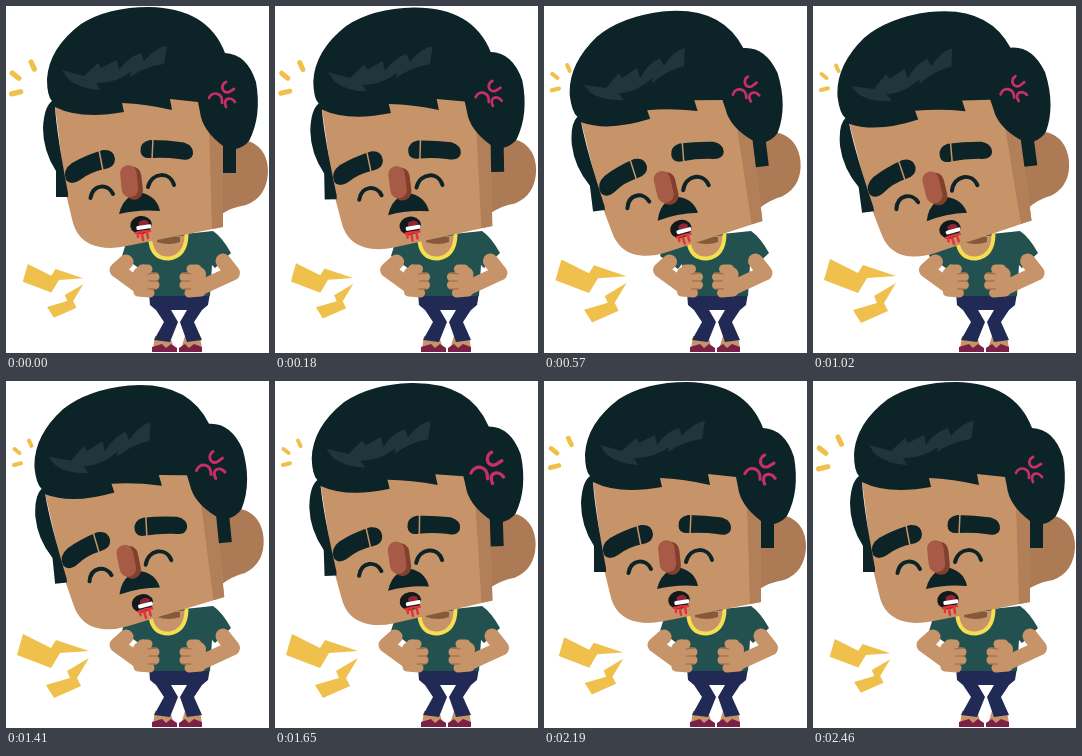
These frames come from a looping animation (263 by 347 pixels, 2.49 s). An HTML page:

```html
<!DOCTYPE html>
<html lang="en">
<head>
<meta charset="utf-8">
<title>Stomach ache</title>
<style>
  html, body { margin: 0; width: 100%; height: 100%; overflow: hidden; background: #fff; }
  svg { display: block; width: 100%; height: 100%; }
  .line { fill: none; stroke-linecap: round; stroke-linejoin: round; }
  .hair { fill: #0c2327; }
  .skin { fill: #c79369; }
  .limb { stroke: #c79369; }
  .crease { stroke: #9a693f; stroke-width: 1; }
</style>
</head>
<body>
<svg viewBox="0 0 263 347">
  <defs>
    <g id="hand" class="line">
      <path class="limb" stroke-width="9" d="M136 263 L142 263 M135 271 H149 M134 279 H149 M132 286 L144 287"/>
      <path class="limb" stroke-width="14" d="M134 268 L135 282"/>
      <path class="crease" d="M142 268 L151 267 M143 275 H152 M142 283 H150"/>
    </g>
  </defs>

  <g id="sparks" class="line" stroke="#f0c04a" stroke-width="4">
    <path d="M23 59.500 L25.500 65 M8.500 68 L13.500 72 M8 84 L15 82.300"/>
  </g>
  <g id="bolts" fill="#efc04b">
    <path d="M11 274 L17 253 L45 267 L50 259 L83 270 L54 272 L45 287Z"/>
    <path d="M83 277 L61 290 L64 297 L40 304 L48 317 L75 305 L71 297Z"/>
  </g>

  <g id="legs">
    <path class="skin" d="M149 330 H164 L168 343 H147Z M179 330 H194 L196 343 H175Z"/>
    <path fill="#7b2046" d="M146 346 V341 L156 338 L160 342 L165 338 L171 342 V346Z M173 346 V342 L179 338 L183 342 L188 338 L196 341 V346Z"/>
    <path fill="#202a55" d="M143 287 H204 L202 299 L196 304 L188 316 L196 334 L181 336 L174 316 L181 304 H165 L172 316 L164 336 L148 334 L158 316 L150 304 L144 299Z"/>
  </g>

  <path fill="#225150" d="M121 234 L207 225 Q216 231 225 247 L209 262 L206 259 L204 290 H142 L138 258 L134 263 L116 250Z"/>
  <path class="skin" d="M144 234 Q145 251 162 251 Q180 250 181 229Z"/>
  <path fill="#85593a" d="M151 231 H174 V236 Q163 240 151 236Z"/>
  <path class="line" stroke="#f5de50" stroke-width="4" d="M144.500 236 Q147 253 163 252.500 Q180 250 180.500 229"/>

  <g id="leftArm">
    <path class="line limb" stroke-width="15" d="M120 256 L111 264 L133 280"/>
    <use href="#hand"/>
  </g>
  <g id="rightArm">
    <path class="line limb" stroke-width="15" d="M217 255 L226.500 267 L194 282"/>
    <use href="#hand" transform="matrix(-1 0 0 1 327 0)"/>
  </g>

  <g id="head">
    <path fill="#ac7a55" d="M214 142 Q230 132 245 136 Q262 144 262 166 Q261 191 240 199 Q226 201 214 209Z"/>
    <path class="skin" d="M48 92 L200 88 L217 135 V221 L118 240.500 Q105 243 94 241 Q71 237 66 213 L60 188Z"/>
    <path fill="#b17f58" d="M203 122 L217 138 V221 L206 223Z"/>
    <path class="hair" d="M50 191 V165 Q37 145 37 122 Q38 101 46 95 Q41 90 41 73 Q43 42 75 18 Q102 1 143 1 Q202 2 219 47 Q241 48 250 76 Q256 110 243 135 Q238 141 230 143 V167 H217 V140 Q196 124 194 106 L192 96 L164 93 L166 104 Q140 98 116 97 L118 106 Q75 114 49 101 Q51 130 62 187 V191Z"/>
    <path fill="#1f363a" d="M56 64 L62 73 Q74 83 94 84 L90 77 Q108 78 125 66 L124 71 Q140 60 158 58 L161 40 Q150 41 138 55 L135 47 Q122 51 113 64 L111 54 L95 62 L92 57 L78 70Z"/>
    <g id="anger" class="line" stroke="#c82f66" stroke-width="2.700">
      <path d="M220 76 C214 79 216 88 223 86 L228 83 M203 92 C206 85 217 86 216 97 M220 101 C216 92 225 90 229 96"/>
    </g>

    <g id="features" transform="translate(-1 1)">
      <path class="hair" d="M61 173 Q57 163 67 156 Q81 148 98 143 Q109 142 110 152 Q110 160 100 162 Q85 165 75 173 Q66 179 61 173Z"/>
      <path class="hair" d="M135.500 144 Q135 135 145 133 Q162 133 179 135.500 Q189 139 188 147 Q186 155 174 152 Q160 150 146 151 Q136 152 135.500 144Z"/>
      <path class="line" stroke="#c79369" stroke-width="1.500" d="M94 143 L98 164 M148 131 L147 153"/>
      <path class="line" stroke="#0c2327" stroke-width="4" d="M85.500 191 C88 177 103 176 108 187 M143 180 C147 165 165 164 169 178"/>
      <path class="hair" d="M114 207 Q117 194 126 189 L138 186 Q152 190 155 204 Q134 202 114 207Z"/>
      <g transform="rotate(-6 126 175)">
        <rect x="119" y="160" width="18" height="33" rx="9" fill="#81402e"/>
        <rect x="116" y="158" width="16.500" height="32" rx="8" fill="#a75a45"/>
      </g>

      <g transform="rotate(-8 136 218)">
        <ellipse cx="136" cy="218" rx="10.800" ry="9" fill="#11191c"/>
        <path fill="#8e2635" d="M134 215 Q140 211 144 216 L143 219 H134Z"/>
        <rect x="131" y="218.500" width="15" height="4" rx="1.500" fill="#fff"/>
      </g>
      <path class="line" stroke="#e5323b" stroke-width="2.500" d="M131 226 Q138 224 145 224 M133 227 V230 M137 227 L138 233 M142 225 L143 231"/>
    </g>
  </g>
</svg>
<script>
  const LOOP = 2490;
  const part = id => document.getElementById(id);

  // Sine ease in and out between two times, giving 0 to 1.
  const ramp = (t, from, to) => {
    const p = Math.min(1, Math.max(0, (t - from) / (to - from)));
    return (1 - Math.cos(Math.PI * p)) / 2;
  };
  const pulse = (t, rise, top, fall, end) => ramp(t, rise, top) - ramp(t, fall, end);

  const place = (id, transform) => part(id).setAttribute("transform", transform);
  const scaleAt = (id, x, y, s) =>
    place(id, `translate(${x} ${y}) scale(${s}) translate(${-x} ${-y})`);

  function draw(t) {
    const tilt = pulse(t, 0, 700, 1170, 1890);
    const burst = pulse(t, 0, 700, 1740, LOOP);
    const squeeze = 5.5 * pulse(t, 0, 500, 600, 1380);

    place("head", `rotate(${-7.6 * tilt} 168 206)`);
    scaleAt("anger", 216, 88, 1 + 0.33 * pulse(t, 1170, 1890, 1890, LOOP));
    scaleAt("bolts", 47, 284.5, 0.84 + 0.16 * burst);
    scaleAt("sparks", 16, 71, 1.3 - 0.3 * burst);
    place("leftArm", `translate(${squeeze} 0)`);
    place("rightArm", `translate(${-squeeze} 0)`);
  }

  const start = performance.now();
  function loop() {
    draw((performance.now() - start) % LOOP);
    requestAnimationFrame(loop);
  }
  loop();
</script>
</body>
</html>
```
